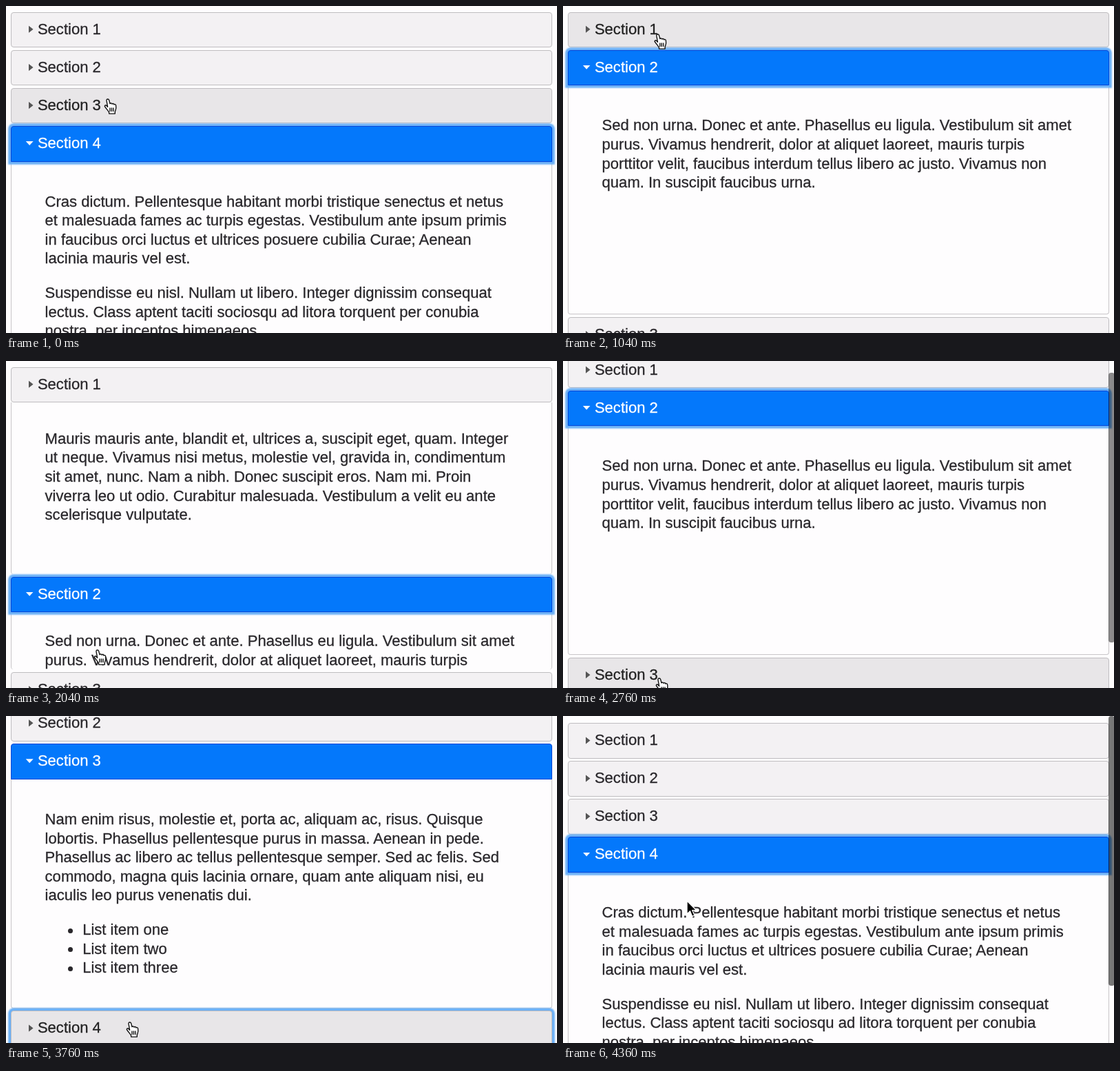
These frames come from a looping animation (800x474 px, 4.4 s). An HTML page:

```html
<!DOCTYPE html>
<html lang="en">
<head>
<meta charset="utf-8">
<title>Accordion</title>
<style>
html, body { margin: 0; width: 100%; height: 100%; overflow: hidden; background: #fefdfe; }
body {
  position: relative; color: #29272b; font: 22.05px/27.6px "Liberation Sans", Arial, sans-serif;
  -webkit-text-stroke: .3px;
}
body > * { position: absolute; box-sizing: border-box; }
.head {
  left: 7px; width: 786px; height: 51.8px; padding-left: 37.9px; line-height: 48.6px;
  border: 1.3px solid #bfbdc0; border-radius: 4px; background: #f3f1f3;
}
.head::before {
  content: ""; position: absolute; left: 24.5px; top: 18.8px; width: 7px; height: 11px;
  background: #555; clip-path: polygon(0 0, 100% 50%, 0 100%);
}
.hover { background: #e8e6e8; color: #222; }
.active { background: #0478fb; border-color: #0546d8; border-radius: 4px 4px 0 0; color: #fff; }
.active::before {
  left: 20.7px; top: 21.2px; width: 11px; height: 6px;
  background: #f4f8ff; clip-path: polygon(0 0, 100% 0, 50% 100%);
}
.focus { z-index: 2; box-shadow: 0 0 2px 3.8px #6ab0f7; }
.panel {
  left: 7px; width: 786px; padding-left: 48.6px; overflow: hidden; white-space: pre;
  border: solid #c8c6c9; border-width: 0 1.3px; border-radius: 0 0 4px 4px;
}
.open { border-bottom-width: 1.3px; }
p, ul { margin: 22.05px 0; padding: 0; }
li { position: relative; margin-left: 54.6px; list-style: none; }
li::before {
  content: ""; position: absolute; left: -21.5px; top: 11.5px;
  width: 7px; height: 7px; border-radius: 50%; background: #29272b;
}
#bar { left: 792px; width: 8.5px; height: 391px; border-radius: 4px; background: rgba(0, 0, 0, .53); z-index: 3; }
#cursor { left: 0; top: 0; width: 1px; height: 1px; overflow: visible; z-index: 4; }
</style>
</head>
<body>
<div id="bar"></div>
<svg id="cursor">
  <g id="hand" transform="translate(-7 -1)" stroke="#111" stroke-width="1.4" stroke-linejoin="round" stroke-linecap="round">
    <path fill="#fff" d="M5 3.2C4.6.6 8 .2 8.7 2.6L10 7.6c.6-1.2 2.6-1 3 .4 .8-1.1 2.6-.6 2.8.8 1-.8 2.6-.2 2.8 1.2 .5 3 .3 5-.6 7.2l-.7 2v2.9H8.8l-.4-2.6C6.6 17.3 5 15 3.2 12.8 1.2 10.4 3.4 9 5 10.6l1.6 1.6z"/>
    <path d="M10 14v4.5M12.5 14v4.5M15 14v4.5"/>
  </g>
  <path id="beam" fill="none" stroke="#222" stroke-width="1.5" d="M-4.5-10.5Q0-10.5 0-7V7Q0 10.5-4.5 10.5M4.5-10.5Q0-10.5 0-7M0 7Q0 10.5 4.5 10.5M-3 4H3"/>
  <path id="arrow" fill="#000" stroke="#fff" stroke-width="1.2" transform="scale(1.12)" d="M0 0V17L4 13.3 6.8 20 9.8 18.7 7 12.2H12.3Z"/>
</svg>
<script>
const LOOP = 4400, SLIDE = 240, PRESS = 30, TOP = 8.5, STEP = 55.1, HEAD = 51.8, PANEL = 332, PAD = 22.05;

const texts = [
  `<p>Mauris mauris ante, blandit et, ultrices a, suscipit eget, quam. Integer
ut neque. Vivamus nisi metus, molestie vel, gravida in, condimentum
sit amet, nunc. Nam a nibh. Donec suscipit eros. Nam mi. Proin
viverra leo ut odio. Curabitur malesuada. Vestibulum a velit eu ante
scelerisque vulputate.</p>`,
  `<p>Sed non urna. Donec et ante. Phasellus eu ligula. Vestibulum sit amet
purus. Vivamus hendrerit, dolor at aliquet laoreet, mauris turpis
porttitor velit, faucibus interdum tellus libero ac justo. Vivamus non
quam. In suscipit faucibus urna.</p>`,
  `<p>Nam enim risus, molestie et, porta ac, aliquam ac, risus. Quisque
lobortis. Phasellus pellentesque purus in massa. Aenean in pede.
Phasellus ac libero ac tellus pellentesque semper. Sed ac felis. Sed
commodo, magna quis lacinia ornare, quam ante aliquam nisi, eu
iaculis leo purus venenatis dui.</p><ul><li>List item one</li><li>List item two</li><li>List item three</li></ul>`,
  `<p>Cras dictum. Pellentesque habitant morbi tristique senectus et netus
et malesuada fames ac turpis egestas. Vestibulum ante ipsum primis
in faucibus orci luctus et ultrices posuere cubilia Curae; Aenean
lacinia mauris vel est.</p><p>Suspendisse eu nisl. Nullam ut libero. Integer dignissim consequat
lectus. Class aptent taciti sociosqu ad litora torquent per conubia
nostra, per inceptos himenaeos.</p>`
];

// [time, section]
const clicks = [[-999, 3], [140, 2], [640, 1], [1170, 0], [1961, 1], [2810, 2], [3780, 3]];
// [time, value]
const scrollKeys = [[0, 0], [2380, 0], [2560, 21], [3140, 21], [3340, 78.6], [4060, 78.6], [4320, -1.6]];
const barKeys = [[0, 0], [2370, 0], [2410, 1], [2700, 1], [2960, 0], [3130, 0], [3170, 1], [3460, 1], [3640, 0], [4050, 0], [4090, 1]];
// [time, x, y, shape]
const cursorKeys = [
  [0, 148, 135, "hand"], [300, 147, 137, "hand"], [480, 143, 92, "hand"], [760, 142, 92, "hand"],
  [950, 138, 41, "hand"], [1280, 137, 41, "hand"], [1360, 136, 85, "beam"], [1680, 133, 405, "hand"],
  [1760, 133, 419, "hand"], [2160, 133, 419, "beam"], [2620, 138, 450, "hand"], [2740, 140, 460, "hand"],
  [2880, 140, 460, "hand"], [2980, 146, 390, "beam"], [3070, 148, 361, "beam"], [3360, 150, 365, "beam"],
  [3520, 176, 432, "hand"], [3660, 180, 444, "hand"], [4020, 180, 444, "arrow"], [4260, 180, 268, "arrow"]
];

const last = (keys, t) => keys.findLastIndex(k => k[0] <= t);

function at(keys, t, col = 1) {
  const i = last(keys, t), a = keys[i], b = keys[i + 1];
  if (!b) return a[col];
  const p = (t - a[0]) / (b[0] - a[0]);
  return a[col] + (b[col] - a[col]) * p * p * (3 - 2 * p);
}

const add = (cls, html) => {
  const el = document.createElement("div");
  el.className = cls;
  el.innerHTML = html;
  return document.body.appendChild(el);
};
const sections = texts.map((text, i) => ({ head: add("head", "Section " + (i + 1)), panel: add("panel", text) }));
const get = id => document.getElementById(id);

function draw(now) {
  const t = now % LOOP;
  const c = last(clicks, t), open = clicks[c][1], prev = c ? clicks[c - 1][1] : -1;
  const slide = .5 - Math.cos(Math.PI * Math.min(1, (t - clicks[c][0]) / SLIDE)) / 2;
  const focus = clicks[last(clicks, t + PRESS)][1];
  const scroll = at(scrollKeys, t), x = at(cursorKeys, t, 1), y = at(cursorKeys, t, 2);
  const shape = cursorKeys[last(cursorKeys, t)][3];

  let top = TOP - scroll;
  sections.forEach(({ head, panel }, i) => {
    const part = i === open ? slide : i === prev ? 1 - slide : 0;
    const over = shape === "hand" && y >= top && y <= top + HEAD;
    head.style.top = top + "px";
    head.className = "head" + (i === open ? " active" : over ? " hover" : "") + (i === focus ? " focus" : "");
    panel.style.display = part ? "block" : "none";
    panel.style.top = top + HEAD + "px";
    panel.style.height = PANEL * part + "px";
    panel.style.paddingTop = PAD * part + "px";
    panel.className = part === 1 ? "panel open" : "panel";
    top += STEP + PANEL * part;
  });

  get("bar").style.top = 1 + scroll * .78 + "px";
  get("bar").style.opacity = at(barKeys, t);
  get("cursor").style.transform = `translate(${x}px, ${y}px)`;
  for (const id of ["hand", "beam", "arrow"]) get(id).style.display = id === shape ? "" : "none";
}

const start = performance.now();
function tick() {
  draw(performance.now() - start);
  requestAnimationFrame(tick);
}
tick();
</script>
</body>
</html>
```
